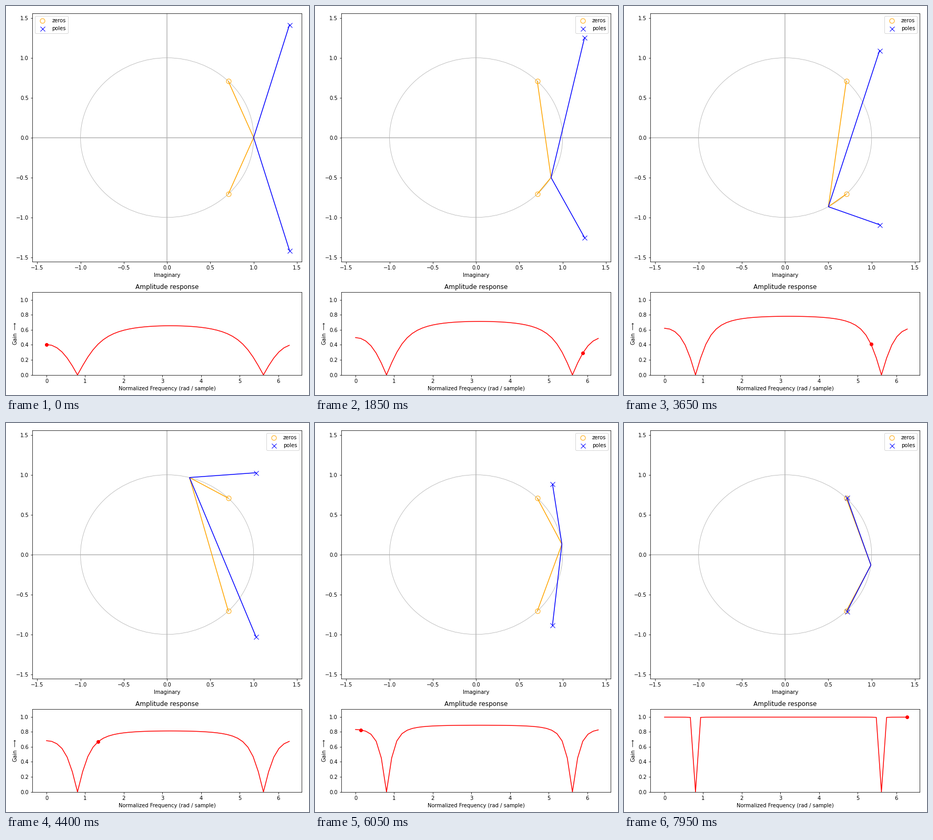
Animation of 576x741 px, one loop 8 s. Source, as a matplotlib script:

```python
import numpy as np
import matplotlib.pyplot as plt
from matplotlib.animation import FuncAnimation
from matplotlib.patches import Circle

W, H, DPI = 576, 741, 72
FRAMES, INTERVAL = 160, 50
STEPS, TURNS = 48, 4
LAST = STEPS * TURNS - 1
R_START, R_END = 2.0, 1.01

freq = np.linspace(0, 2 * np.pi, STEPS)
unit = np.exp(2j * np.pi * np.arange(STEPS) / STEPS)
pair = np.exp(1j * np.pi / 4 * np.array([1, -1]))


def gain(radius):
    """Amplitude response on the unit circle, scaled to about one."""
    z = unit[:, None]
    ratio = np.abs((z - pair) / (z - radius * pair)).prod(axis=1)
    return ratio * (1 + radius) / 2


def add_axes(left, top, right, bottom):
    """Axes placed by pixel edges, measured from the top left corner."""
    return fig.add_axes([left / W, 1 - bottom / H,
                         (right - left) / W, (bottom - top) / H])


def set_points(line, points):
    line.set_data(np.real(points), np.imag(points))


fig = plt.figure(figsize=(W / DPI, H / DPI), dpi=DPI, facecolor="white")

# Pole-zero plane
plane = add_axes(50.2, 14.2, 562.2, 487.2)
lim = 1.1 * np.sqrt(2)
plane.set(xlim=(-lim, lim), ylim=(-lim, lim), xlabel="Imaginary")
plane.axhline(0, color="0.7")
plane.axvline(0, color="0.7")
plane.add_patch(Circle((0, 0), 1, fill=False, ec="0.7", lw=0.8))

zeros, = plane.plot(pair.real, pair.imag, "o", ms=9, mfc="none",
                    mec="orange", mew=1, label="zeros")
poles, = plane.plot([], [], "x", ms=9, mec="blue", mew=1, label="poles")
zero_arms, = plane.plot([], [], color="orange", solid_joinstyle="bevel")
pole_arms, = plane.plot([], [], color="blue", solid_joinstyle="bevel")
plane.legend(loc="best")

# Amplitude response
resp = add_axes(50.2, 545.3, 562.2, 702.7)
resp.set(xlim=(-0.365, 6.606), ylim=(0, 1.1), title="Amplitude response",
         xlabel="Normalized Frequency (rad / sample)",
         ylabel=r"Gain $\longrightarrow$")
curve, = resp.plot([], [], color="red")
dot, = resp.plot([], [], "o", color="red")


def update(i):
    step = round(1.2 * i)
    k = step % STEPS
    radius = R_START + (R_END - R_START) * step / LAST
    p, z = radius * pair, unit[k]
    set_points(poles, p)
    set_points(zero_arms, [pair[0], z, pair[1]])
    set_points(pole_arms, [p[0], z, p[1]])
    g = gain(radius)
    curve.set_data(freq, g)
    dot.set_data([freq[k]], [g[k]])
    return poles, zero_arms, pole_arms, curve, dot


anim = FuncAnimation(fig, update, frames=FRAMES, interval=INTERVAL,
                     repeat=True, repeat_delay=0)
plt.show()
```
